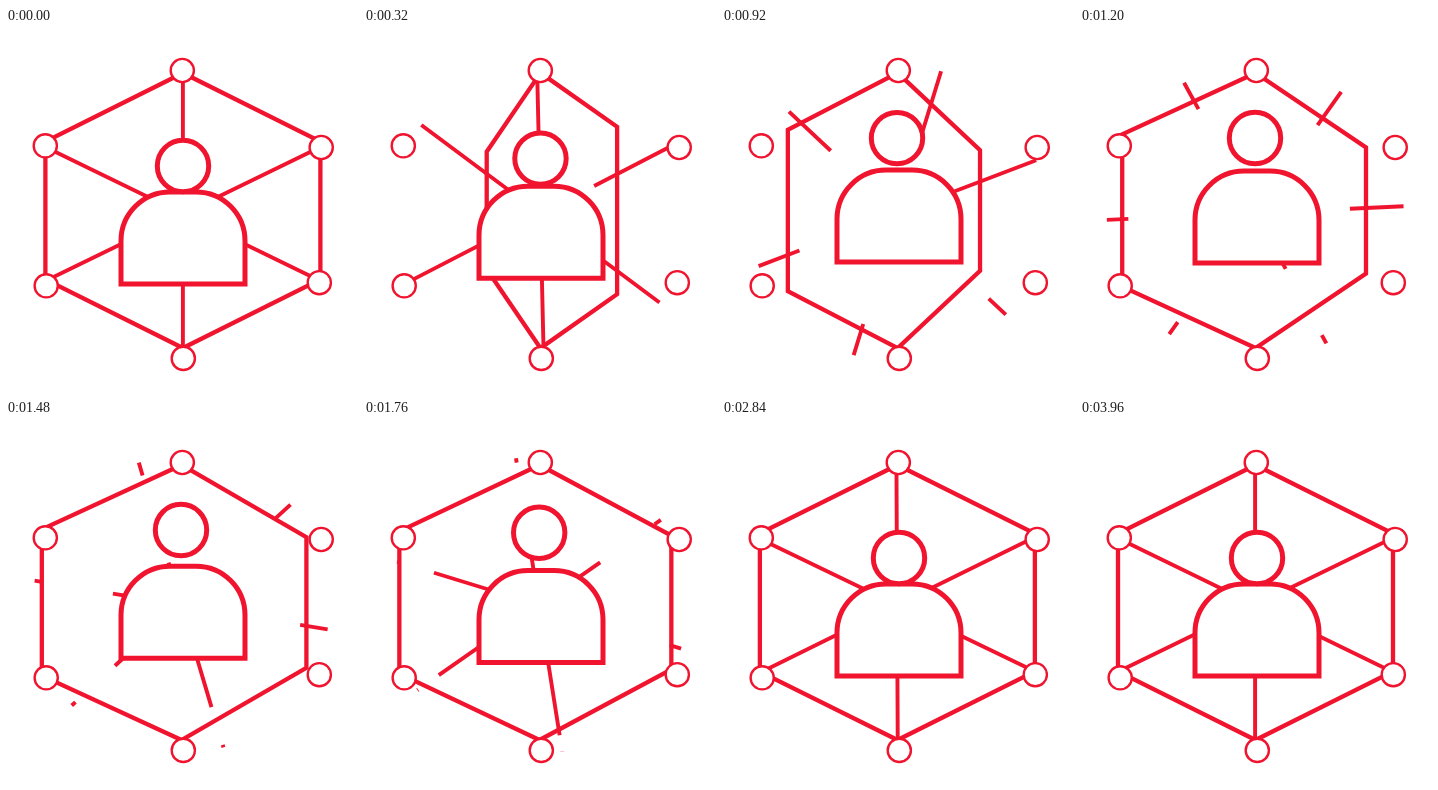
These frames come from a looping animation (352 px wide and 364 px high, 4000 ms). An HTML page:

```html
<!DOCTYPE html>
<html lang="en">
<head>
<meta charset="utf-8">
<title>Connected person</title>
<style>
  html, body { margin: 0; width: 100%; height: 100%; overflow: hidden; background: #fff; }
  svg { display: block; width: 100%; height: 100%; }
  path, circle { stroke: #f0142f; fill: #fff; }
  #hexagon { fill: none; stroke-width: 4.3; }
  #spokes { fill: none; stroke-width: 3.9; }
  #nodes circle { stroke-width: 2.4; }
  #body, #head { stroke-width: 5; }
</style>
</head>
<body>
<svg viewBox="0 0 352 364">
  <path id="spokes"/>
  <path id="hexagon"/>
  <g id="nodes"></g>
  <path id="body" d="M115 256V213A49 49 0 0 1 164 164H190A49 49 0 0 1 239 213V256Z"/>
  <circle id="head" cx="177" cy="138" r="25.7"/>
</svg>
<script>
const LOOP = 4000, FRAME = 40;
const SPOKE_LENGTH = 148.5, STAGGER = 125, PERSPECTIVE = 700;
const NODES = [[176.3, 42.5], [315.2, 119.5], [313.3, 254.7], [177.3, 330.4], [40.2, 257.8], [39.3, 117.8]];
const HEXAGON = [[0, -137.5], [137.5, -69], [137.5, 69], [0, 137.5], [-137.5, 69], [-137.5, -69]];
const SPOKE_ANGLES = [90, 154, 206, 270, 334, 26];

const byId = id => document.getElementById(id);
const rad = degrees => degrees * Math.PI / 180;
const progress = (t, start, end) => Math.min(1, Math.max(0, (t - start) / (end - start)));
const easeOut = (p, power) => 1 - (1 - p) ** power;
const smooth = p => p * p * (3 - 2 * p);
const cubicInOut = p => p < .5 ? 4 * p ** 3 : 1 - 4 * (1 - p) ** 3;
const point = (x, y) => x.toFixed(2) + ' ' + y.toFixed(2);

byId('nodes').innerHTML = NODES.map(([x, y]) => `<circle cx="${x}" cy="${y}" r="11.6"/>`).join('');

// Half turn about the vertical axis, seen in perspective
function hexagonPath(turn) {
  const corners = HEXAGON.map(([x, y]) => {
    const px = x - .7;
    const scale = PERSPECTIVE / (PERSPECTIVE + px * Math.sin(turn));
    return point(176.2 + px * Math.cos(turn) * scale, 182.5 + y * scale);
  });
  return 'M' + corners.join('L') + 'Z';
}

// Each spoke empties from the centre outwards, then refills the same way
function spokesPath(t, turn) {
  const cx = 176 - .9 * Math.cos(turn), cy = 185.5 - .5 * Math.cos(turn);
  return SPOKE_ANGLES.map((degrees, i) => {
    const angle = rad(degrees) - turn;
    const at = r => point(cx + r * Math.cos(angle), cy + r * Math.sin(angle));
    const local = t - i * STAGGER;
    const emptied = SPOKE_LENGTH * easeOut(progress(local, 0, 2000), 3);
    const filled = SPOKE_LENGTH * easeOut(progress(local, 926, 2538), 3);
    const segment = (from, to) => to - from > .1 ? `M${at(from)}L${at(to)}` : '';
    return segment(0, filled) + segment(emptied, SPOKE_LENGTH);
  }).join('');
}

function draw(t) {
  const turn = Math.PI * (1 - easeOut(progress(t, 0, 3900), 5));
  byId('hexagon').setAttribute('d', hexagonPath(turn));
  byId('spokes').setAttribute('d', spokesPath(t, turn));

  const rise = smooth(progress(t, 0, 950));
  const bodyLift = rise - smooth(progress(t, 950, 2850));
  const headLift = rise - cubicInOut(progress(t, 1400, 2640));
  byId('body').setAttribute('transform', `translate(0 ${-22 * bodyLift})`);
  byId('head').setAttribute('transform', `translate(${-2 * headLift} ${-28 * headLift})`);
}

const start = performance.now();
function tick() {
  const elapsed = (performance.now() - start) % LOOP;
  draw(Math.floor(elapsed / FRAME) * FRAME);
  requestAnimationFrame(tick);
}
tick();
</script>
</body>
</html>
```
